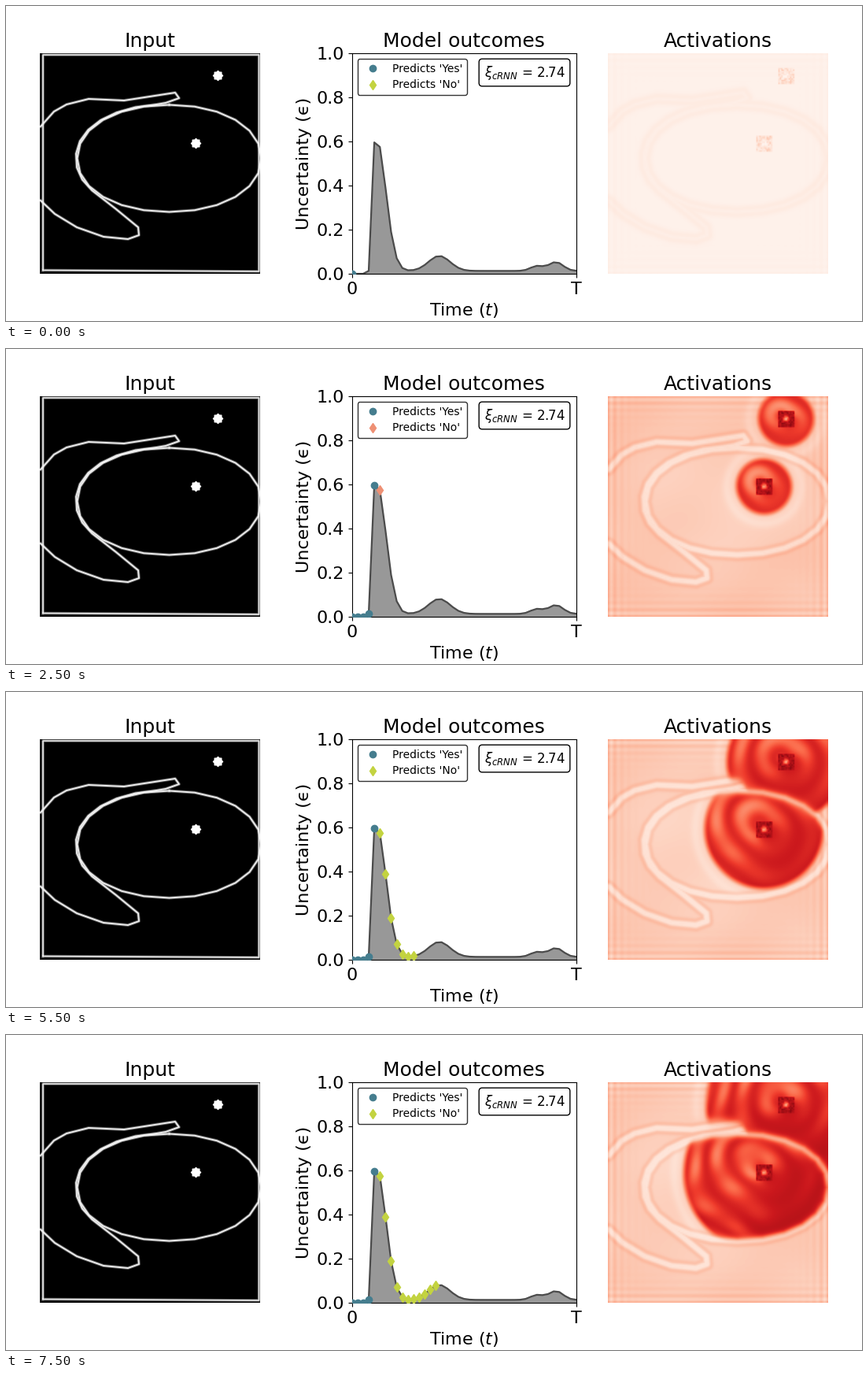
These frames come from a looping animation (1088x400 px, 8 s). A matplotlib script:

```python
import numpy as np
import matplotlib.pyplot as plt
from matplotlib.animation import FuncAnimation
from matplotlib.path import Path

W, H, DPI = 1088, 400, 100
STEPS, INTERVAL = 16, 500
SIDE, CELLS = 280, 150
DOTS = [(226.5, 28.5), (198.5, 114.5)]
LAST_YES = 4

plt.rcParams["font.family"] = "DejaVu Sans"


def bump(x, center, width):
    return np.exp(-((x - center) / width) ** 2)


def sigmoid(x):
    return 1 / (1 + np.exp(-np.clip(x, -40, 40)))


def oval(start, stop, count, scale=1):
    """Arc of a slightly squared ellipse in panel pixels, y down."""
    a = np.radians(np.linspace(start, stop, count))
    c, s = np.cos(a), np.sin(a)
    power = 2 / 2.1
    return np.c_[164.5 + 117 * scale * np.sign(c) * abs(c) ** power,
                 133.5 + 68 * scale * np.sign(s) * abs(s) ** power]


def uncertainty(k):
    """Sharp spike followed by low bumps."""
    spike = np.where(k > 3, .6 * bump(k, 4.4, 2.35), 0)
    tail = (.013 + .068 * bump(k, 15.6, 2.7) + .022 * bump(k, 33, 1.6)
            + .04 * bump(k, 36.4, 1.8))
    return spike + np.where(k > 2, tail, 0)


def distance(points):
    """Distance from every cell to a polyline."""
    best = np.full(X.shape, 1e9)
    for (x0, y0), (x1, y1) in zip(points[:-1], points[1:]):
        dx, dy = x1 - x0, y1 - y0
        t = np.clip(((X - x0) * dx + (Y - y0) * dy) / (dx * dx + dy * dy), 0, 1)
        best = np.minimum(best, np.hypot(X - x0 - t * dx, Y - y0 - t * dy))
    return best


def stripes(b):
    return .07 * np.cos(2 * np.pi * b / 9) * np.exp(-b / 11)


ELLIPSE = oval(-90, 270, 25)
ARM = np.vstack([
    [(1, 93), (18, 74), (34, 65), (62, 58), (107, 60), (172, 50), (177, 57),
     (160, 63)],
    oval(-97, -215, 10, 1.015),
    [(97, 198), (125, 221), (126, 231), (112, 236), (81, 233), (47, 221),
     (19, 204), (1, 187)]])

grid = (np.arange(CELLS) + .5) * SIDE / CELLS
X, Y = np.meshgrid(grid, grid)
noise = np.random.default_rng(4).random(X.shape)

edge = distance(ELLIPSE)
inside = Path(ELLIPSE).contains_points(np.c_[X.ravel(), Y.ravel()]).reshape(X.shape)
depth = np.where(inside, edge, -edge)
contour = np.minimum(edge, distance(ARM))
border_x = np.minimum(X, SIDE - X)
border_y = np.minimum(Y, SIDE - Y)
border = np.minimum(border_x, border_y)

in_mask = sigmoid((depth - 3) / 2)
floor = 48 + 300 * sigmoid((X - 196) / 7)
out_mask = sigmoid((-depth - 3) / 2) * sigmoid((floor - Y) / 3)
waves = (np.sin(X / 23 + Y / 41) + np.sin(Y / 17 - X / 60) + np.sin((X + Y) / 31)) / 3
relief = -.085 * bump(contour, 1, 2.5) + .055 * bump(contour, 6, 2.5)
frame_lines = stripes(border_x) + stripes(border_y) + .04 * np.exp(-border / 25)


def spread(field, n, dot, mask, phase):
    """Grow a rippled disc around a dot, held back by the contour."""
    dx, dy = X - dot[0], Y - dot[1]
    r, angle = np.hypot(dx, dy), np.arctan2(dy, dx)
    late = np.clip((n - 5) / 10, 0, 1)
    lag = 7 + 6.67 * n - r
    field = field - .04 * mask * bump(lag, -7, 6) * min(n / 5, 1)
    front = np.clip(lag / 10, 0, 1)
    front = front * front * (3 - 2 * front)
    upper_left = .5 - .5 * np.cos(angle - .8 - phase)
    swirl = .5 + .5 * np.sin(dx / 14 + dy / 9 + .35 * n + phase)
    warp = lag + 12 * late * waves + 4 * np.sin(2 * angle + phase)
    ripple = .5 + .5 * np.cos(2 * np.pi * (warp - 23) / 30)
    level = (.68 + .12 * late * (1 - upper_left)
             - (.04 + .27 * upper_left) * ripple * (1 - .5 * late * swirl)
             + .05 * late * waves)
    return field + (level - field) * front * mask


def add_core(field, n, dot):
    """Dark square with a pale center at a dot."""
    dx, dy = X - dot[0], Y - dot[1]
    r = np.hypot(dx, dy)
    square = np.maximum(abs(dx), abs(dy)) < 10
    dark = np.interp(n, [0, 1, 3], [.2, .5, .93])
    level = dark - .16 * noise - .6 * dark * bump(r, 0, 3.4)
    return np.where(square, level, field)


def activation(n):
    power = np.interp(n, [0, 1, 3], [0, .5, 1])
    base = np.interp(n, [0, 1, 3, 7], [.025, .13, .22, .19]) - .025 * power * in_mask
    field = base + power * (relief + frame_lines + .016 * waves)
    field = field + (1 - power) * (.035 * bump(contour, 4, 4) + .2 * frame_lines)
    if n:
        field = spread(field, n, DOTS[0], out_mask, .5)
        field = spread(field, n, DOTS[1], in_mask, 0)
    for dot in DOTS:
        field = add_core(field, n, dot)
    return np.clip(field, 0, 1)


def add_panel(x, w):
    return fig.add_axes([x / W, 60 / H, w / W, SIDE / H])


def chalk(points, width=1.9):
    x, y = np.transpose(points)
    for extra, alpha in ((.9, .35), (-.5, .95)):
        ax_in.plot(x, y, color="#f4f4f4", alpha=alpha, lw=width + extra,
                   solid_joinstyle="round")


fig = plt.figure(figsize=(W / DPI, H / DPI), dpi=DPI, facecolor="white")

# Input
ax_in = add_panel(43, SIDE)
ax_in.set(xlim=(0, SIDE), ylim=(SIDE, 0), xticks=[], yticks=[], facecolor="black")
ax_in.spines[:].set_visible(False)
ax_in.set_title("Input", fontsize=18)
chalk(ELLIPSE)
chalk(ARM)
chalk([(4, 275.5), (4, 2), (278.5, 2), (278.5, 277), (4, 275.5)], 1.7)
turn = np.arange(16) * np.pi / 8
star = np.where(np.arange(16) % 2, 5, 6.5)
for cx, cy in DOTS:
    ax_in.fill(cx + star * np.cos(turn), cy + star * np.sin(turn), color="white", lw=.5)

# Outcomes
ax = add_panel(439.6, 285)
steps = np.arange(41)
curve = uncertainty(steps)
ax.fill_between(steps, curve, color="#989898", lw=0)
ax.plot(steps, curve, color="#4b4b4b", lw=1.6)
yes_dots, = ax.plot([], [], "o", ms=6, color="#457d8e", label="Predicts 'Yes'", zorder=3)
no_dots, = ax.plot([], [], "d", ms=6.3, label="Predicts 'No'", zorder=3)
ax.set(xlim=(0, 40), ylim=(0, 1))
ax.set_xticks([0, 40], ["0", "T"])
ax.tick_params(labelsize=16)
ax.set_title("Model outcomes", fontsize=18)
ax.set_xlabel("Time ($t$)", fontsize=16)
ax.set_ylabel("Uncertainty (\u03f5)", fontsize=16)
legend = ax.legend(loc="upper left", fontsize=10, edgecolor="black")
fig.text(710.5 / W, 1 - 84.5 / H, r"$\xi_{cRNN}$ = 2.74", fontsize=12,
         ha="right", va="center",
         bbox=dict(boxstyle="round,pad=0.38,rounding_size=0.25",
                   facecolor="white", edgecolor="black"))

# Activations
ax_act = add_panel(765, SIDE)
ax_act.set_title("Activations", fontsize=18)
heat = ax_act.imshow(activation(0), cmap="Reds", vmin=0, vmax=1, aspect="auto",
                     interpolation="bilinear", extent=(0, SIDE, SIDE, 0))
ax_act.axis("off")


def update(n):
    k = steps[:n + 1]
    for dots, part in ((yes_dots, k[k <= LAST_YES]), (no_dots, k[k > LAST_YES])):
        dots.set_data(part, curve[part])
    color = "#ee9074" if 2 <= n < 9 else "#c3d340"
    no_dots.set_color(color)
    legend.legend_handles[1].set_color(color)
    heat.set_data(activation(n))
    return yes_dots, no_dots, heat


anim = FuncAnimation(fig, update, frames=STEPS, interval=INTERVAL,
                     repeat=True, repeat_delay=0, blit=False)
plt.show()
```
